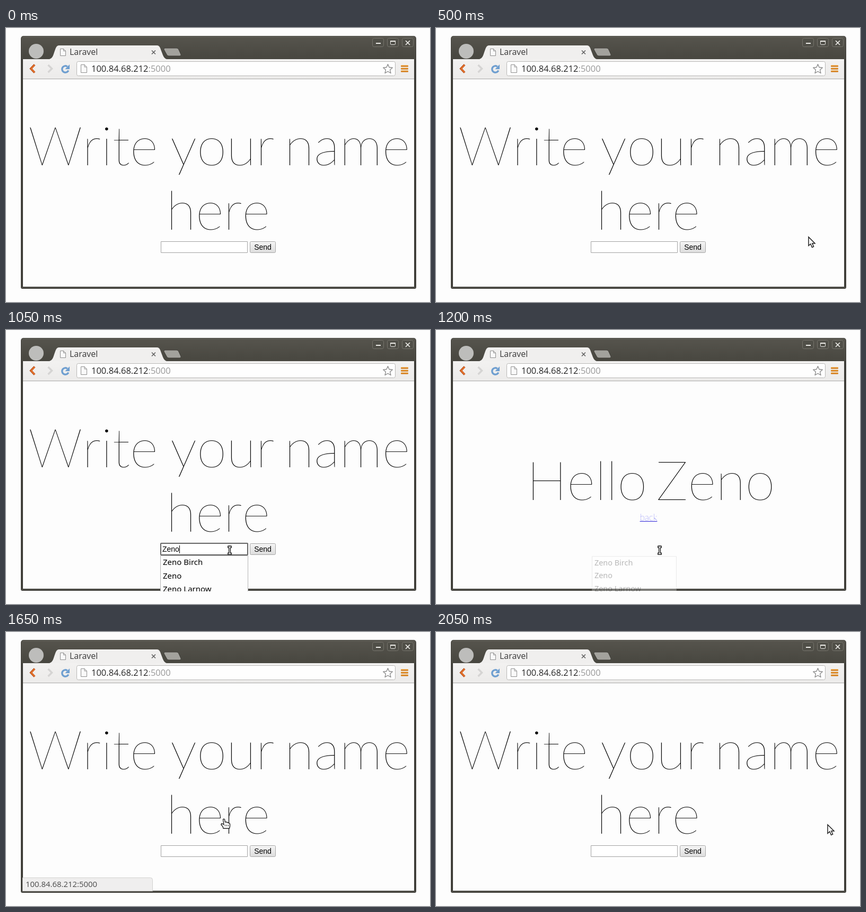
Recreate the animation shown at these times as an HTML page with a canvas. Size 800 by 519 pixels, loop 2100 ms.

```html
<!DOCTYPE html>
<html lang="en">
<head>
<meta charset="utf-8">
<title>Browser form</title>
<style>
html, body { margin: 0; width: 100%; height: 100%; overflow: hidden; background: #fdfdfd; }
canvas { display: block; width: 800px; height: 519px; }
</style>
</head>
<body>
<canvas id="stage" width="800" height="519"></canvas>
<script>
const ctx = document.getElementById('stage').getContext('2d');
const LOOP = 2100, STEP = 50;
const PAPER = '#fdfdfd', CHROME = '#f0efee', FRAME = '#403f3a';
const UI = '"Open Sans", "Noto Sans", sans-serif';
const LIST = '"Noto Sans", "Open Sans", sans-serif';
const THIN = 'Lato, "Open Sans", sans-serif';
const FORM = '"Liberation Sans", Arial, sans-serif';
const NAME = 'Zeno';
const HINTS = ['Zeno Birch', 'Zeno', 'Zeno Larnow'];

// time, x, y of the pointer's hot spot
const PATH = [
  [450, 755, 392], [650, 422, 417], [1250, 422, 417],
  [1450, 411, 354], [1700, 411, 354], [2050, 739, 365]
];

function rect(x, y, w, h, fill) {
  ctx.fillStyle = fill;
  ctx.fillRect(x, y, w, h);
}

function box(x, y, w, h, r, fill, stroke, width = 1) {
  ctx.beginPath();
  ctx.roundRect(x, y, w, h, r);
  if (fill) { ctx.fillStyle = fill; ctx.fill(); }
  if (stroke) { ctx.strokeStyle = stroke; ctx.lineWidth = width; ctx.stroke(); }
}

function shape(points, fill, stroke, width = 1, close = true) {
  ctx.beginPath();
  points.forEach(([x, y]) => ctx.lineTo(x, y));
  if (close) ctx.closePath();
  if (fill) { ctx.fillStyle = fill; ctx.fill(); }
  if (stroke) { ctx.strokeStyle = stroke; ctx.lineWidth = width; ctx.stroke(); }
}

function line(points, color, width) {
  shape(points, null, color, width, false);
}

function text(str, x, y, font, color, align = 'left') {
  ctx.font = font;
  ctx.fillStyle = color;
  ctx.textAlign = align;
  ctx.fillText(str, x, y);
  return ctx.measureText(str).width;
}

function shade(y0, y1, from, to) {
  const g = ctx.createLinearGradient(0, y0, 0, y1);
  g.addColorStop(0, from);
  g.addColorStop(1, to);
  return g;
}

function pageIcon(x, y, w, h) {
  const c = w * 0.4;
  shape([[x, y], [x + w - c, y], [x + w, y + c], [x + w, y + h], [x, y + h]], '#fafafa', '#8d8d8d');
  line([[x + w - c, y], [x + w - c, y + c], [x + w, y + c]], '#8d8d8d', 1);
}

function titleBar() {
  box(28, 15, 746, 479, [5, 5, 3, 3], FRAME);
  box(29, 16, 744, 43, [4, 4, 0, 0], shade(16, 58, '#56544d', '#484740'));
  rect(32, 16, 738, 1, '#6a6860');
  rect(29, 491, 744, 1, '#5a5953');

  ctx.beginPath();
  ctx.arc(57, 44, 14, 0, Math.PI * 2);
  ctx.fillStyle = '#bdbdbb';
  ctx.fill();

  [691.5, 719.5, 747.5].forEach(x => box(x, 19.5, 21, 16, 3, '#504f48', '#77756d'));
  rect(698, 28, 9, 2, '#efeeea');
  box(725.5, 24.5, 9, 7, 1, null, '#efeeea');
  rect(725, 24, 10, 2, '#efeeea');
  line([[754, 24], [762, 32]], '#efeeea', 1.7);
  line([[762, 24], [754, 32]], '#efeeea', 1.7);
}

function tabs() {
  ctx.beginPath();
  ctx.moveTo(82, 59);
  ctx.bezierCurveTo(88, 57, 89, 52, 91, 46);
  ctx.bezierCurveTo(94, 38, 95, 33, 100, 33);
  ctx.lineTo(285, 33);
  ctx.bezierCurveTo(290, 33, 291, 38, 294, 46);
  ctx.bezierCurveTo(297, 54, 298, 57, 303, 59);
  ctx.fillStyle = CHROME;
  ctx.fill();
  pageIcon(102.5, 39.5, 10, 13);
  text('Laravel', 120, 51, '16px ' + UI, '#3a3a3a');
  line([[275, 42.5], [282, 49.5]], '#666', 1.7);
  line([[282, 42.5], [275, 49.5]], '#666', 1.7);

  ctx.beginPath();
  ctx.moveTo(300, 38);
  ctx.lineTo(322, 38);
  ctx.quadraticCurveTo(325, 38, 326, 41);
  ctx.lineTo(330, 50);
  ctx.quadraticCurveTo(331, 53, 328, 53);
  ctx.lineTo(307, 53);
  ctx.quadraticCurveTo(304, 53, 303, 50);
  ctx.lineTo(298, 41);
  ctx.quadraticCurveTo(297, 38, 300, 38);
  ctx.fillStyle = '#a3a29d';
  ctx.fill();
  ctx.strokeStyle = '#3c3b36';
  ctx.lineWidth = 1;
  ctx.stroke();
}

function toolBar() {
  rect(32, 59, 738, 38, shade(59, 97, '#f2f1f0', '#ecebea'));
  rect(32, 96, 738, 1, '#a9a8a6');

  line([[54, 69.5], [47, 77], [54, 84.5]], '#b5501c', 4);
  line([[54, 70], [47.5, 77], [54, 84]], '#e8742c', 2.2);
  line([[79.5, 70], [86.5, 77], [79.5, 84]], '#d5d4d3', 3.5);

  ctx.beginPath();
  ctx.arc(112, 78, 6.2, -0.9, 0.4, true);
  ctx.strokeStyle = '#6f9fd0';
  ctx.lineWidth = 3.4;
  ctx.stroke();
  shape([[120, 69], [120, 78], [111.5, 78]], '#6f9fd0');

  box(133.5, 63.5, 601, 27, 3, '#fefefe', '#b9b8b6');
  pageIcon(141.5, 69.5, 11, 15);
  const w = text('100.84.68.212', 161, 83, '16.5px ' + UI, '#262626');
  text(':5000', 161 + w, 83, '16.5px ' + UI, '#979797');

  const star = Array.from({ length: 10 }, (_, i) => {
    const a = -Math.PI / 2 + i * Math.PI / 5, r = i % 2 ? 4.3 : 9.3;
    return [720.5 + r * Math.cos(a), 78 + r * Math.sin(a)];
  });
  ctx.lineJoin = 'round';
  shape(star, '#fff', '#858585', 1.3);
  ctx.lineJoin = 'miter';

  [70.5, 75.5, 80.5].forEach(y => box(745, y, 14, 3, 1, shade(y, y + 3, '#f0a030', '#c2680c')));
}

// Unkerned headline word whose ink starts at x
function word(str, x, y) {
  ctx.save();
  ctx.fontKerning = 'none';
  ctx.font = '100 102px ' + THIN;
  ctx.textAlign = 'left';
  ctx.fillStyle = '#000';
  ctx.fillText(str, x + ctx.measureText(str).actualBoundingBoxLeft, y);
  ctx.restore();
}

function formPage(t) {
  const focus = t >= 700 && t < 1150;
  const typed = focus ? NAME.slice(0, Math.max(0, Math.floor((t - 800) / STEP))) : '';
  word('Write', 45, 260);
  word('your', 312, 260);
  word('name', 534.5, 260);
  word('here', 311.5, 382);
  if (focus) box(292, 404, 164, 22, 1, '#fff', '#646464', 2);
  else box(292.5, 404.5, 163, 21, 0, '#fff', '#a2a2a2');
  box(460.5, 404.5, 48, 21, 2, shade(404, 426, '#f5f5f5', '#dcdcdc'), '#a6a6a6');
  text('Send', 484.5, 420, '14px ' + FORM, '#000', 'center');
  if (focus) {
    const w = text(typed, 295, 420, '14px ' + FORM, '#000');
    rect(Math.round(295 + w), 408, 1, 15, '#000');
  }
}

function helloPage() {
  word('Hello', 182, 322);
  word(NAME, 419, 322);
  const w = text('back', 401, 361, '100 17px ' + THIN, '#0000ee', 'center');
  rect(401 - w / 2, 362, w, 1, '#2a1fd6');
}

function hints(t) {
  const out = Math.max(0, (t - 1100) / 100);
  const k = 1 - 0.037 * out;
  ctx.save();
  ctx.beginPath();
  ctx.rect(0, 0, 800, 495);
  ctx.clip();
  ctx.globalAlpha = 1 - 0.72 * out;
  ctx.translate(374, 466);
  ctx.scale(k, k);
  ctx.translate(-374, -466);
  box(291.5, 427.5, 165, 90, 0, PAPER, '#b4b4b4');
  HINTS.forEach((s, i) => text(s, 296, 445 + i * 25.5, '500 15px ' + LIST, '#000'));
  ctx.restore();
}

function statusBubble(alpha) {
  ctx.save();
  ctx.globalAlpha = alpha;
  box(31.5, 465.5, 245, 25, [0, 4, 0, 0], '#efeeee', '#d2d1d0');
  text('100.84.68.212:5000', 37, 483, '14.9px ' + UI, '#4a4a4a');
  ctx.restore();
}

function arrow() {
  shape([[0, 0], [0, 16.5], [3.8, 13], [6.6, 19.5], [9.6, 18.2], [6.9, 12], [12, 12]], '#fff', '#222', 1.5);
}

function beam() {
  const bars = [[-2.5, -7, 5, 1.5], [-2.5, 6, 5, 1.5], [-0.7, -7, 1.4, 14]];
  bars.forEach(([x, y, w, h]) => rect(x - 1.4, y - 1.4, w + 2.8, h + 2.8, '#1c1c1c'));
  bars.forEach(([x, y, w, h]) => rect(x, y, w, h, '#fff'));
}

function hand() {
  ctx.lineJoin = 'round';
  shape([[-1.5, 1], [0, 0], [1.5, 1], [2.5, 6], [5, 6], [7.5, 7], [10, 8], [11.5, 9.5],
    [11.5, 14], [10.5, 18], [-1, 18], [-2, 14.5], [-5, 11], [-4.5, 9], [-2, 9.5], [0, 11]],
    '#fff', '#222', 1.4);
  [2.5, 5.5, 8.5].forEach(x => line([[x, 11], [x, 14]], '#333', 1));
  ctx.lineJoin = 'miter';
}

function pointer(t) {
  if (t < PATH[0][0]) return;
  const i = Math.max(1, PATH.findIndex(p => p[0] >= t));
  const [t0, x0, y0] = PATH[i - 1], [t1, x1, y1] = PATH[i];
  const u = (t - t0) / (t1 - t0), e = u * u * (3 - 2 * u);
  ctx.save();
  ctx.translate(x0 + (x1 - x0) * e, y0 + (y1 - y0) * e);
  if (t >= 650 && t <= 1250) beam();
  else if (t >= 1450 && t <= 1700) hand();
  else arrow();
  ctx.restore();
}

function draw(t) {
  rect(0, 0, 800, 519, PAPER);
  titleBar();
  tabs();
  toolBar();
  rect(32, 97, 738, 393, PAPER);
  if (t >= 1150 && t < 1600) helloPage();
  else formPage(t);
  if (t >= 1450 && t < 1800) statusBubble(t < 1700 ? 1 : (1800 - t) / 150);
  if (t >= 850 && t < 1250) hints(t);
  pointer(t);
}

const start = performance.now();
function tick() {
  const t = (performance.now() - start) % LOOP;
  draw(Math.floor(t / STEP) * STEP);
  requestAnimationFrame(tick);
}
tick();
</script>
</body>
</html>
```
